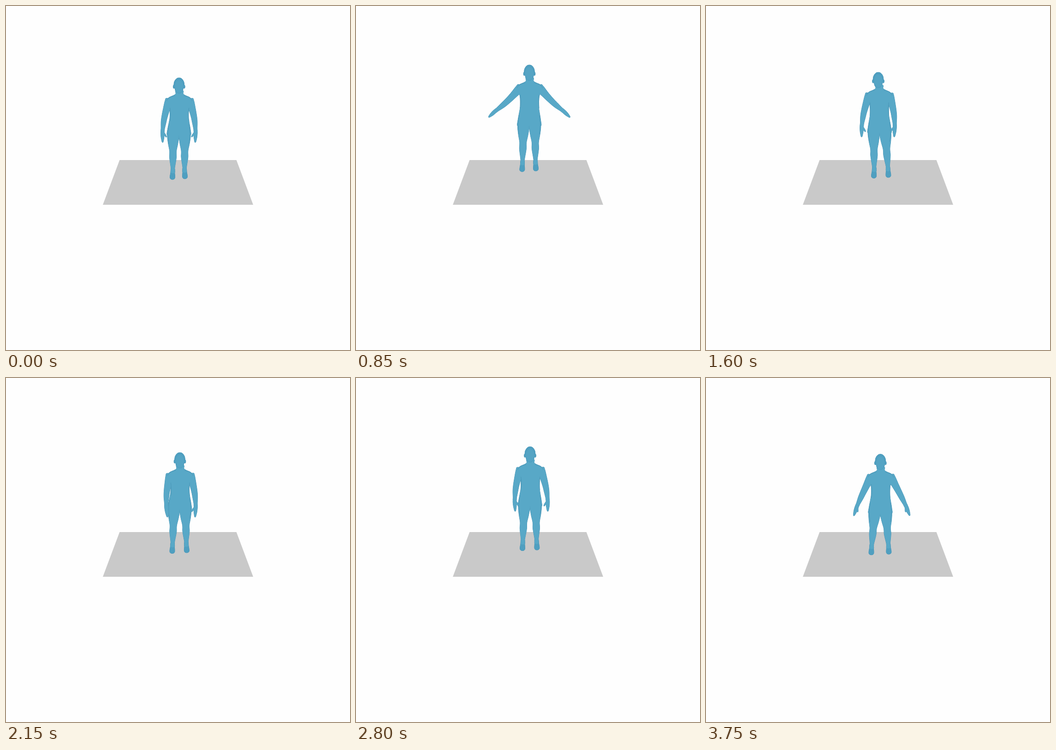
Recreate the animation shown at these times as an HTML page. Size 748 by 748 pixels, loop 3.8 s.

```html
<!DOCTYPE html>
<html lang="en">
<head>
<meta charset="utf-8">
<title>Hopping figure</title>
<style>
  html, body { margin: 0; width: 100%; height: 100%; overflow: hidden; background: #fefefe; }
  svg { display: block; width: 100vw; height: 100vh; }
</style>
</head>
<body>
<svg viewBox="0 0 748 748">
  <path d="M247 335H501L537.5 432.3H210.5Z" fill="#c9c9c9"/>
  <g id="edges" fill="#4691b2" stroke="#4691b2" stroke-linejoin="round"></g>
  <g id="fills"></g>
  <g id="shades" fill="none" stroke="#4691b2" stroke-linecap="round" stroke-width="1.4" opacity=".5"></g>
</svg>
<script>
const LOOP = 3800, STEP = 50, GRAVITY = 0.00063;
const SKIN = "#58a8c7", DARK = "#4f9fc0";

const hops = [
  { peak: 850, top: 128, length: 232 },
  { peak: 1690, top: 139, length: 230 },
  { peak: 2975, top: 130, length: 226 },
  { peak: 3530, top: 135, length: 226 }
];
const crouches = [
  { mid: 400, span: 300, depth: 18 },
  { mid: 1280, span: 240, depth: 14 },
  { mid: 1930, span: 150, depth: 5 },
  { mid: 2610, span: 210, depth: 14 },
  { mid: 3240, span: 90, depth: 4 },
  { mid: 3850, span: 250, depth: 16 }
];

const mix = (a, b, k) => a + (b - a) * k;
const clamp = v => Math.max(0, Math.min(1, v));
const ease = k => (k = clamp(k), k * k * (3 - 2 * k));
// Rises from 0 to 1 at mid and falls back within span on either side
const bump = (t, mid, span) => Math.cos(Math.PI / 2 * clamp(Math.abs(t - mid) / span)) ** 2;

function poseAt(t) {
  const u = t / LOOP;
  const arcs = hops.map(h => h.top + GRAVITY * (t - h.peak) ** 2);
  const stance = crouches.reduce((y, c) => y + c.depth * bump(t, c.mid, c.span), mix(156, 162, ease(t / 1200)));
  const top = Math.min(stance, ...arcs);
  const toe = Math.min(mix(377, 384.5, u), ...arcs.map((y, i) => y + hops[i].length));
  const stretch = Math.max(...hops.map(h => bump(t, h.peak, 450)));

  const drift = bump(t, 1600, 350), landing = bump(t, 3850, 350);
  const hip = mix(376, 379, u), head = hip + .3 - 3 * drift;
  const feet = hip - .5 + 4 * drift;
  const gap = mix(13.8, 16, ease(t / 1500)) - 2.5 * bump(t, 3300, 300) + 4 * landing;

  const reach = 36 + 48 * bump(t, 970, 420) + 22 * landing + 5 * bump(t, 400, 300) - 4 * bump(t, 2150, 450);
  const skew = 2.5 * ease((t - 1600) / 500);
  const raise = Math.max(0, (reach - 36) / 38);

  return {
    top, head, hip, chest: (head + hip) / 2 + 1,
    crotch: top + 125 + 8 * stretch,
    flare: clamp(raise),
    wristY: top + 118 - 16 * raise ** 2,
    wrist: side => head + side * (reach + side * skew),
    foot: side => [feet + side * gap, toe - (side > 0 ? 1.5 : 0)]
  };
}

const num = v => v.toFixed(2);

// Closed smooth curve through the points
function smooth(pts) {
  const n = pts.length, p = i => pts[(i + n) % n];
  let d = `M${pts[0].map(num)}`;
  for (let i = 0; i < n; i++) {
    const [a, b, c, e] = [p(i - 1), p(i), p(i + 1), p(i + 2)];
    const q = b.map((v, j) => v + (c[j] - a[j]) / 6);
    const r = c.map((v, j) => v - (e[j] - b[j]) / 6);
    d += "C" + [...q, ...r, ...c].map(num).join(" ");
  }
  return d + "Z";
}

// Tapered shape around a spine of [x, y, half width]
function limb(spine) {
  const left = [], right = [];
  spine.forEach(([x, y, w], i) => {
    const a = spine[Math.max(0, i - 1)], b = spine[Math.min(spine.length - 1, i + 1)];
    const dx = b[0] - a[0], dy = b[1] - a[1], len = Math.hypot(dx, dy) || 1;
    left.push([x - dy / len * w, y + dx / len * w]);
    right.unshift([x + dy / len * w, y - dx / len * w]);
  });
  return smooth([...left, ...right]);
}

function ellipse(x, y, rx, ry) {
  return `M${num(x - rx)} ${num(y)}a${rx} ${ry} 0 1 0 ${2 * rx} 0a${rx} ${ry} 0 1 0 ${-2 * rx} 0Z`;
}

function arm(side, p) {
  const sx = p.chest + side * 23, sy = p.top + 52;
  const wx = p.wrist(side), wy = p.wristY;
  const along = (k, w) => {
    const bend = Math.sin(Math.PI * k);
    return [mix(sx, wx, k) + side * 2.5 * (1 - p.flare) * bend, mix(sy, wy, k) + 3 * p.flare * bend, w];
  };
  const turn = Math.atan2(wy - sy, wx - sx) + side * .22 * (1 - p.flare);
  const len = 22 - 4 * p.flare, ux = Math.cos(turn) * len, uy = Math.sin(turn) * len;
  const hand = (k, off, w) => [wx + ux * k + side * uy * off, wy + uy * k - side * ux * off, w];
  const thumb = .36 - .22 * p.flare;
  return [
    limb([along(-.08, 7), along(0, 8.6), along(.25, 7.2), along(.5, 6.2), along(.68, 5.5), along(.88, 4), along(1, 3.3)]),
    limb([hand(-.1, 0, 3.2), hand(.35, 0, 3.7), hand(.7, 0, 2.7), hand(1, 0, 1.1)]),
    limb([hand(0, 0, 2), hand(.25, -thumb * .6, 1.7), hand(.48, -thumb, 1)])
  ];
}

function leg(side, p) {
  const [fx, fy] = p.foot(side), hip = p.hip + side * 12.6, ankle = fx - side;
  const at = (k, w) => [mix(hip, ankle, clamp(k / .8)), mix(p.crotch, fy, k), w];
  return limb([at(-.14, 10), at(0, 12.6), at(.19, 10.5), at(.36, 7.4), at(.5, 7.5), at(.64, 5.6), at(.76, 3.9), at(.85, 4)]);
}

function foot(side, p) {
  const [x, y] = p.foot(side);
  const at = (up, w) => [x - side * up * .05, y - up, w];
  return limb([at(24, 3.6), at(15, 4.4), at(6, 5.5), at(2, 4.8), at(0, 2)]);
}

function torso({ top, crotch, chest, hip }) {
  const drop = crotch - top;
  const profile = [[7.6, 28], [8.2, 35], [14, 39], [22, 42.5], [27, 48], [26, 57], [21, 68],
    [20.2, drop * .68], [22, drop * .78], [25, drop - 11], [25.2, drop], [12, drop + 4]];
  const half = s => profile.map(([w, y]) => [mix(chest, hip, clamp((y - 40) / (drop - 40))) + s * w, top + y]);
  return smooth([...half(1), [hip, crotch - 1], ...half(-1).reverse()]);
}

function figure(p) {
  const both = fn => [-1, 1].flatMap(side => fn(side, p));
  const parts = [
    ...both(foot).map(d => [d, DARK]),
    ...[...both(leg), ...both(arm), torso(p)].map(d => [d, SKIN]),
    ...both(s => ellipse(p.head + s * 11.3, p.top + 19.5, 1.6, 3.8)).map(d => [d, DARK]),
    [ellipse(p.head, p.top + 24, 8.8, 10.5), DARK],
    [ellipse(p.head, p.top + 15, 11.4, 15), DARK],
    [ellipse(p.head, p.top + 19, 8.8, 14), "#55a4c4"]
  ];
  const shades = both(s => {
    const line = (x, y, w, bend, h) => `M${num(x + s * w)} ${num(y)}q${num(s * bend)} ${h / 2} 0 ${h}`;
    return [
      line(p.chest, p.top + 66, 20.5, -2, 28),
      line(p.hip, p.crotch - 24, 22, 4, 42),
      `M${num(p.chest + s * 10)} ${num(p.top + 39)}q${s * 14} 2 ${s * 18} 11`
    ];
  });
  return { parts, shades };
}

function paths(id, count) {
  const group = document.getElementById(id);
  while (group.children.length < count)
    group.appendChild(document.createElementNS("http://www.w3.org/2000/svg", "path"));
  return group.children;
}

function draw(t) {
  const { parts, shades } = figure(poseAt(t));
  const edge = paths("edges", parts.length), fill = paths("fills", parts.length);
  parts.forEach(([d, colour], i) => {
    edge[i].setAttribute("d", d);
    fill[i].setAttribute("d", d);
    fill[i].setAttribute("fill", colour);
  });
  const shade = paths("shades", shades.length);
  shades.forEach((d, i) => shade[i].setAttribute("d", d));
}

const start = performance.now();
function tick() {
  const t = (performance.now() - start) % LOOP;
  draw(Math.floor(t / STEP) * STEP);
  requestAnimationFrame(tick);
}
tick();
</script>
</body>
</html>
```
